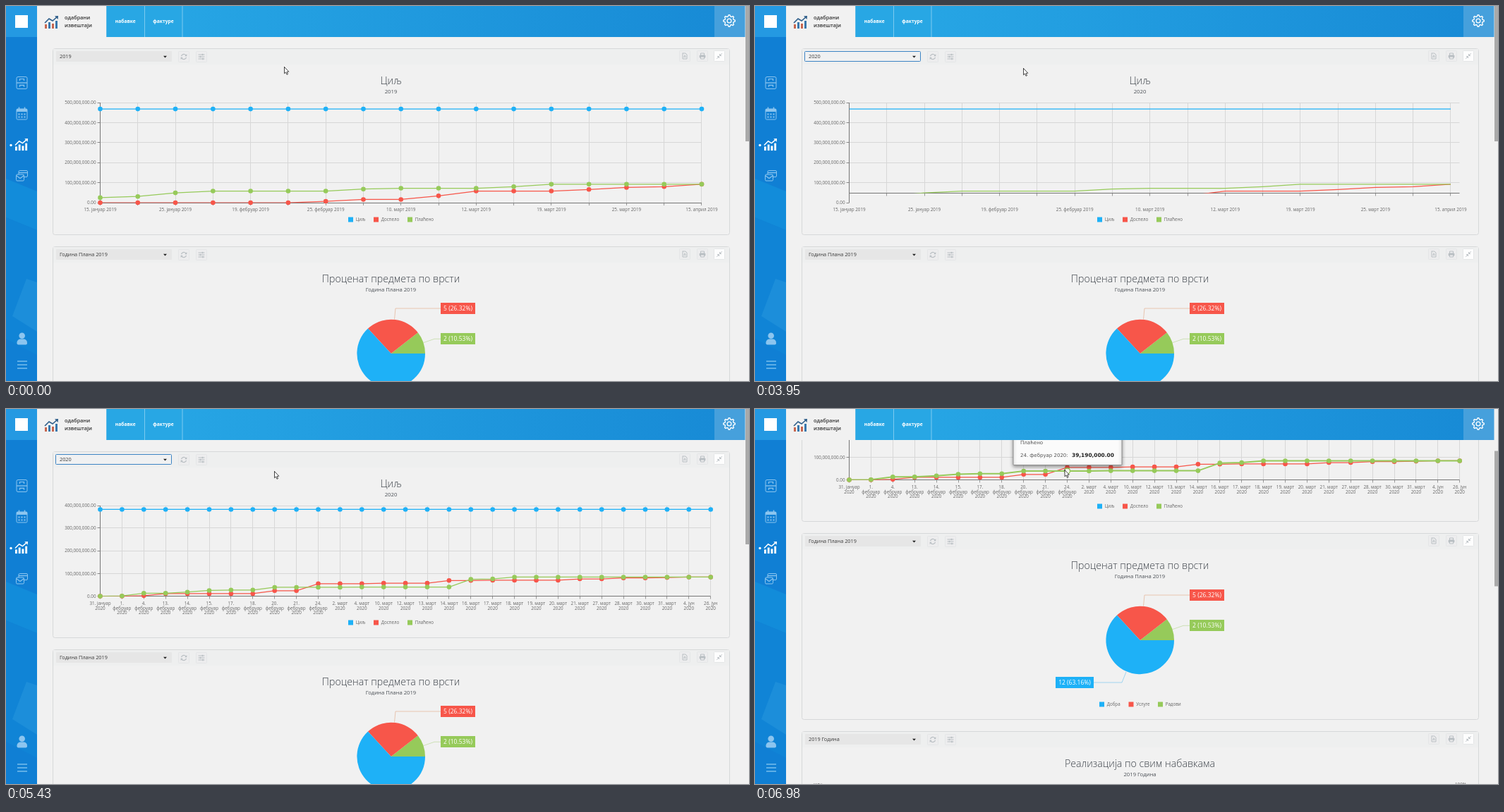
Write an HTML page with a canvas that moves like this. It is 1053 px wide and 532 px high and loops after 8000 ms.

```html
<!DOCTYPE html>
<html lang="sr">
<head>
<meta charset="utf-8">
<title>Извештаји</title>
<style>
html, body { margin: 0; width: 100%; height: 100%; overflow: hidden; background: #f1f1f1; }
canvas { display: block; }
</style>
</head>
<body>
<canvas id="stage" width="1053" height="532"></canvas>
<script>
const W = 1053, H = 532, LOOP = 8000;
const ctx = document.getElementById('stage').getContext('2d');
const BLUE = '#1eb1f7', RED = '#f7564a', GREEN = '#96ca5a';
const FONT = '"Open Sans", "Noto Sans", sans-serif';
const WIDE_FONT = '"DejaVu Sans", sans-serif';

const repeat = (value, n) => Array(n).fill(value);
// Values in hundreds of millions
const BEFORE = [
  repeat(4.68, 17),
  [...repeat(0, 6), .07, .16, .16, .34, .58, .58, .58, .66, .76, .8, .92],
  [.25, .31, .49, ...repeat(.58, 4), .68, .72, .72, .72, .8, ...repeat(.92, 5)]
];
const AFTER = [
  repeat(3.82, 29),
  [0, 0, .02, ...repeat(.11, 5), .24, .24, ...repeat(.55, 3), ...repeat(.57, 3), .69, .69,
    ...repeat(.7, 4), .76, .76, .8, .8, .82, .84, .84],
  [0, .01, .13, .13, .18, .25, .27, .27, ...repeat(.39, 4), ...repeat(.4, 5), .74, .76, ...repeat(.84, 10)]
];
const COLORS = [BLUE, RED, GREEN];
const DATES_2019 = ['15. јануар', '25. јануар', '19. фебруар', '25. фебруар', '10. март', '12. март',
  '19. март', '25. март', '15. април'];
const days = (list, month) => list.split(' ').map(day => [day + '.', month]);
const DATES_2020 = [
  ...days('31', 'јануар'),
  ...days('1 4 13 14 15 17 18 20 21 24', 'фебруар'),
  ...days('2 4 10 12 13 14 16 17 18 19 20 21 27 28 30 31', 'март'),
  ...days('4 26', 'јун')
].map(([day, month]) => month === 'фебруар' ? [day, month, '2020'] : [day + ' ' + month, '2020']);

const lerp = (a, b, p) => a + (b - a) * p;
const ramp = (t, a, b) => Math.min(1, Math.max(0, (t - a) / (b - a)));
const smooth = p => p * p * (3 - 2 * p);
const easeOut = (p, power) => 1 - Math.pow(1 - p, power);
const stepped = t => 440 + 77.6 * Math.floor((t - 440) / 77.6);

function rect(x, y, w, h, fill, stroke, radius = 0) {
  ctx.beginPath();
  ctx.roundRect(x, y, w, h, radius);
  if (fill) { ctx.fillStyle = fill; ctx.fill(); }
  if (stroke) { ctx.strokeStyle = stroke; ctx.lineWidth = 1; ctx.stroke(); }
}

function path(points, color, width = 1, fill) {
  ctx.beginPath();
  points.forEach(([x, y]) => ctx.lineTo(x, y));
  if (fill) { ctx.closePath(); ctx.fillStyle = fill; ctx.fill(); }
  if (color) { ctx.strokeStyle = color; ctx.lineWidth = width; ctx.stroke(); }
}

function circle(x, y, r, fill, stroke, width = 1) {
  ctx.beginPath();
  ctx.arc(x, y, r, 0, Math.PI * 2);
  if (fill) { ctx.fillStyle = fill; ctx.fill(); }
  if (stroke) { ctx.strokeStyle = stroke; ctx.lineWidth = width; ctx.stroke(); }
}

function text(str, x, y, size, color = '#666', align = 'left', weight = 400, font = FONT) {
  ctx.font = `${weight} ${size}px ${font}`;
  ctx.textAlign = align;
  ctx.textBaseline = 'middle';
  ctx.fillStyle = color;
  ctx.fillText(str, x, y);
}

function withAlpha(alpha, draw) {
  if (alpha <= 0) return;
  ctx.save();
  ctx.globalAlpha *= alpha;
  draw();
  ctx.restore();
}

function gradient(x0, y0, x1, y1, from, to) {
  const g = ctx.createLinearGradient(x0, y0, x1, y1);
  g.addColorStop(0, from);
  g.addColorStop(1, to);
  return g;
}

function legend(y, items) {
  items.forEach(([x, label], i) => {
    rect(x, y - 3.5, 7, 7, COLORS[i]);
    text(label, x + 10.7, y + .6, 6.2);
  });
}

function toolButton(x, y, icon, fill = '#ededee') {
  rect(x + .5, y + .5, 15, 15, fill, '#e4e6e7', 1);
  ctx.save();
  ctx.translate(x + 8, y + 8);
  const c = '#b9bfc3';
  if (icon === 'refresh') {
    for (const a of [0, Math.PI]) {
      ctx.save();
      ctx.rotate(a);
      ctx.beginPath();
      ctx.arc(0, 0, 3.6, Math.PI * 1.08, Math.PI * 1.85);
      ctx.strokeStyle = c;
      ctx.lineWidth = 1.2;
      ctx.stroke();
      path([[4.4, -4], [4.4, -.8], [1.4, -.8]], null, 0, c);
      ctx.restore();
    }
  } else if (icon === 'sliders') {
    [[-3, 1.5], [0, -1.5], [3, 2]].forEach(([dy, dx]) => {
      path([[-4.5, dy], [4.5, dy]], c);
      rect(dx - .8, dy - 1.2, 1.6, 2.4, c);
    });
  } else if (icon === 'file') {
    path([[-3, -4], [1, -4], [3, -2], [3, 4], [-3, 4], [-3, -4.5]], c, 1);
    path([[-1.3, 2], [0, -1.5], [1.4, 1.4], [-1.3, 1]], c, .8);
  } else if (icon === 'print') {
    rect(-2.5, -4, 5, 3, null, c);
    rect(-4.3, -1.2, 8.6, 3.6, c);
    rect(-2.5, 1, 5, 3, '#ededee', c);
  } else {
    path([[-3.7, 3.7], [-.8, .8]], c);
    path([[3.7, -3.7], [.8, -.8]], c);
    path([[-3, .6], [-.6, .6], [-.6, 3]], c);
    path([[3, -.6], [.6, -.6], [.6, -3]], c);
  }
  ctx.restore();
}

function panel(y, value, title, subtitle, select = {}) {
  rect(66.5, y + .5, 959, 264, '#f1f1f1', '#d6d8d9', 3);
  rect(67, y + 1, 958, 22, '#eeefef');
  const fill = select.focus ? '#f0f1f2' : select.hover ? '#dce3ec' : '#e6e6e6';
  rect(71, y + 4, 164, 15, fill, null, 1);
  if (select.hover && !select.focus) rect(217, y + 4, 18, 15, '#b9cde1');
  if (select.focus) rect(70.5, y + 4.5, 164, 14, null, '#3d84c4', 1);
  text(value, 76, y + 12, 7.3, '#3a3a3a');
  path([[223, y + 10.7], [228, y + 10.7], [225.5, y + 13.4]], null, 0, '#222');
  toolButton(244, y + 4, 'refresh');
  toolButton(269, y + 4, 'sliders');
  toolButton(954, y + 3, 'file');
  toolButton(979, y + 3, 'print');
  toolButton(1003, y + 3, 'collapse', '#fdfdfd');
  text(title, 545.5, y + 47.2, 14.2, '#3b4148', 'center', 300);
  text(subtitle, 545.5, y + 62, 7.7, '#4a4f55', 'center');
}

function lineChart(t, motion) {
  const p = easeOut(ramp(motion, 3950, 5235), 3);
  const morphing = t >= 3950;
  const left = 133.5, top = 137;
  const bottom = morphing ? 265.5 : 279, right = morphing ? 998.5 : 986;
  const zero = lerp(279, 265.5, p), unit = lerp(28.4, 32.2, p);
  const oldAlpha = 1 - ramp(motion, 3950, 4300), newAlpha = ramp(motion, 4400, 4900);
  const grid = '#d7d7d7', axis = '#777';
  const oldX = i => left + 53.28 * i, newX = i => left + 30.9 * i;

  const columns = (count, xAt) => {
    for (let i = 0; i < count; i++) {
      const x = Math.floor(xAt(i)) + .5;
      path([[x, top], [x, bottom]], grid);
      path([[x, bottom], [x, bottom + 4]], '#999');
    }
  };
  withAlpha(oldAlpha, () => {
    columns(17, oldX);
    DATES_2019.forEach((date, i) => text(date + ' 2019', oldX(i * 2), 289.6, 6.3, '#666', 'center'));
  });
  withAlpha(newAlpha, () => {
    columns(29, newX);
    DATES_2020.forEach((lines, i) =>
      lines.forEach((line, row) => text(line, newX(i), 276.6 + row * 6.5, 6.3, '#666', 'center')));
  });

  for (let k = 0; k < 6; k++) {
    const y = Math.max(top, zero - k * unit), lineY = Math.floor(y) + .5;
    withAlpha(k === 5 ? oldAlpha : 1, () => {
      if (y <= bottom) path([[left, lineY], [right, lineY]], grid);
      path([[left - 4, lineY], [left, lineY]], '#888');
      text(k ? k + '00,000,000.00' : '0.00', 127.5, y + .6, 6.3, '#666', 'right');
    });
  }
  path([[left, top], [left, Math.max(bottom, zero)]], axis);
  path([[left, Math.floor(bottom) + .5], [right, Math.floor(bottom) + .5]], axis);

  const curves = AFTER.map((values, s) => {
    const count = morphing ? 29 : 17;
    return Array.from({ length: count }, (_, i) => {
      const j = Math.min(i, 16);
      return [lerp(oldX(j), newX(i), p), zero - unit * lerp(BEFORE[s][j], values[i], p)];
    });
  });
  const hovered = t >= 6740;
  const bulletAlpha = t < 3030 ? 1 : ramp(motion, 4800, 5280);
  curves.forEach((points, s) => {
    ctx.save();
    ctx.beginPath();
    ctx.rect(left, top - 2, right - left, bottom - top + 2.3);
    ctx.clip();
    path(points, COLORS[s], hovered && s === 2 ? 2 : 1.25);
    ctx.restore();
    withAlpha(bulletAlpha, () => points.forEach(([x, y]) => circle(x, y, 3.3, COLORS[s])));
  });
  if (t >= 6830) circle(...curves[2][10], 4, '#f8fbf3', GREEN, 1.5);

  legend(303, [[485, 'Циљ'], [521, 'Доспело'], [569, 'Плаћено']]);
}

function pieChart() {
  const x = 545.7, y = 493, r = 48.3, turn = Math.PI * 2;
  let angle = 0;
  [[2, GREEN], [5, RED], [12, BLUE]].forEach(([count, color]) => {
    const next = angle - turn * count / 19;
    ctx.beginPath();
    ctx.moveTo(x, y);
    ctx.arc(x, y, r, angle, next, true);
    ctx.fillStyle = color;
    ctx.fill();
    angle = next;
  });
  path([[550.5, 444.5], [552, 429], [616, 429]], '#e5b9a0', .8);
  path([[592, 477.5], [607, 472.3], [616, 472.3]], '#c3dca8', .8);
  path([[526, 538], [520, 553], [480, 553]], '#8bcdee', .8);
  const tag = (left, top, w, color, label) => {
    rect(left, top, w, 16, color);
    text(label, left + w / 2, top + 8.8, 8.5, '#fff', 'center');
  };
  tag(616, 421, 49, RED, '5 (26.32%)');
  tag(616, 464, 49, GREEN, '2 (10.53%)');
  tag(426, 545, 54, BLUE, '12 (63.16%)');
  legend(584, [[488, 'Добра'], [529.5, 'Услуге'], [571, 'Радови']]);
}

function shadowed(draw) {
  ctx.save();
  ctx.shadowColor = 'rgba(0,0,0,.4)';
  ctx.shadowBlur = 5;
  ctx.shadowOffsetY = 2;
  draw();
  ctx.restore();
}

function dropdown(cursorY) {
  shadowed(() => rect(71, 80, 164, 37, '#fff'));
  const second = cursorY >= 98;
  rect(72, second ? 98.5 : 80.5, 162, 18, '#337ab7');
  text('2019', 77, 90, 7.3, second ? '#444' : '#fff');
  text('2020', 77, 108, 7.3, second ? '#fff' : '#444');
}

function tooltip(t) {
  withAlpha(ramp(t, 6740, 6960), () => {
    shadowed(() => rect(366, 185, 154, 59.5, '#fbfbfb', '#8d8d8d', 1));
    text('Плаћено', 376, 213.5, 7.1, '#555', 'left', 400, WIDE_FONT);
    text('24. фебруар 2020:', 376, 231, 7, '#555', 'left', 400, WIDE_FONT);
    text('39,190,000.00', 449, 231, 7.4, '#222', 'left', 700, WIDE_FONT);
  });
}

function trendIcon(x, y, s, colors) {
  ctx.save();
  ctx.translate(x, y);
  ctx.scale(s, s);
  [6, 9, 7, 11].forEach((h, i) => rect(i * 5, 18 - h, 3, h, colors[i % 2]));
  path([[0, 10], [6, 4], [11, 7], [18, 1]], colors[2], 1.6);
  path([[14, .3], [19, 0], [18.6, 5]], null, 0, colors[2]);
  ctx.restore();
}

function gear(x, y) {
  ctx.beginPath();
  for (let i = 0; i <= 32; i++) {
    const r = i % 4 < 2 ? 8.3 : 6.3, a = (i - .5) * Math.PI / 16;
    ctx.lineTo(x + r * Math.cos(a), y + r * Math.sin(a));
  }
  ctx.closePath();
  ctx.strokeStyle = '#fff';
  ctx.lineWidth = 1.3;
  ctx.stroke();
  circle(x, y, 2.9, null, '#fff', 1.3);
}

function header() {
  rect(44, 0, 1004, 44, gradient(44, 0, 1004, 0, '#2aace8', '#188bd6'));
  rect(44, 0, 98.5, 44, '#f1f1f1');
  rect(142.5, 0, 107.5, 44, '#28a7e4');
  rect(196, 0, 1, 44, '#7ccbf0');
  rect(249.5, 0, 1, 44, '#7ccbf0');
  rect(1004, 0, 44, 44, '#46a0dc');
  trendIcon(55, 14, 1, ['#c8674f', '#3a78ad', '#2f5f8b']);
  text('одабрани', 83, 17.3, 7.3, '#333', 'left', 600);
  text('извештаји', 83, 28, 7.3, '#333', 'left', 600);
  text('набавке', 169.3, 22.7, 6.7, '#fff', 'center', 700);
  text('фактуре', 223, 22.7, 6.7, '#fff', 'center', 700);
  gear(1025, 21);
}

function sidebar() {
  rect(0, 0, 44, H, '#107fd4');
  path([[0, 245], [44, 263], [44, 318], [0, 300]], null, 0, '#128cda');
  path([[0, 300], [44, 318], [44, 495], [0, 472]], null, 0, '#1084d6');
  path([[29, 387], [44, 392], [44, 462], [9, 440]], null, 0, '#1c8eda');
  rect(0, 0, 44, 44, '#2499e2');
  rect(13, 13, 18, 18, '#fff');

  const c = '#8cc5ef';
  rect(15, 100.5, 15, 17, null, c, 2);
  path([[15, 109], [30, 109]], c, 1.3);
  for (const y of [103.5, 112.3]) path([[19.5, y + 2.5], [19.5, y], [25.5, y], [25.5, y + 2.5]], c, 1.2);

  rect(15, 146, 15, 15, null, c, 1.5);
  rect(15, 146, 15, 4, c);
  for (const x of [18.5, 26.5]) path([[x, 143.5], [x, 147]], c, 1.5);
  for (let i = 0; i < 6; i++) rect(17.5 + i % 3 * 4, 152.5 + Math.floor(i / 3) * 4, 2, 2, c);

  circle(7, 197.5, 1.7, '#fff');
  trendIcon(13, 188, .95, ['#fff', '#fff', '#fff']);

  rect(18, 233.5, 12.5, 9, null, c, 1.5);
  path([[18, 236.5], [30, 236.5]], c, 1.3);
  rect(14.5, 239, 11, 9, '#107fd4', c, 1.5);
  path([[14.5, 240.5], [20, 244.5], [25.5, 240.5]], c, 1.2);

  circle(22.7, 467.7, 4.3, c);
  rect(15.5, 472.5, 14.5, 8, c, null, [5, 5, 2, 2]);
  for (const y of [503, 508, 513]) rect(16, y, 14, 2, '#5daee6');
}

function cursorAt(t) {
  if (t < 1000) {
    const u = smooth(ramp(t, 400, 900));
    return [lerp(394, 248, u), 86 + 38 * Math.sin(Math.PI * u)];
  }
  const legs = [
    [980, 1210, 218, 69], [1680, 2480, 196, 105], [3080, 3710, 380, 88], [6400, 6830, 438.5, 86]
  ];
  let x = 248, y = 86;
  for (const [from, to, nx, ny] of legs) {
    const u = smooth(ramp(t, from, to));
    x = lerp(x, nx, u);
    y = lerp(y, ny, u);
  }
  return [x, y];
}

function cursor(x, y) {
  ctx.save();
  ctx.translate(x + .5, y + .5);
  path([[0, 0], [0, 9.3], [2, 7.4], [3.5, 10.8], [5, 10.1], [3.6, 6.9], [6.3, 6.7], [0, 0], [0, 1]], '#333', .9, '#fff');
  ctx.restore();
}

function render(t) {
  const motion = stepped(t);
  const [cx, cy] = cursorAt(motion);
  const scroll = Math.round(165 * easeOut(ramp(motion, 5850, 6640), 2.28));
  const year = t < 3030 ? '2019' : '2020';
  rect(0, 0, W, H, '#f1f1f1');

  ctx.save();
  ctx.translate(0, -scroll);
  panel(60, year, 'Циљ', year, { hover: t >= 1130, focus: t >= 1550 });
  lineChart(t, motion);
  panel(341, 'Година Плана 2019', 'Проценат предмета по врсти', 'Година Плана 2019');
  pieChart();
  panel(622, '2019 Година', 'Реализација по свим набавкама', '2019 Година');
  text('млн', 83, 698.5, 6.3);
  text('100%', 1008, 698.5, 6.3, '#666', 'right');
  if (t >= 1710 && t < 3110) dropdown(cy);
  tooltip(t);
  ctx.restore();

  header();
  sidebar();
  rect(1047.5, 0, 5.5, H, '#f1f1f1');
  rect(1048, scroll * .361, 5, 192, '#a9a9a9');

  if (t >= 1380 && t < 1550) circle(217.5, 71, 6, 'rgba(240,222,40,.8)');
  cursor(cx, cy);
}

const start = performance.now();
function tick() {
  render((performance.now() - start) % LOOP);
  requestAnimationFrame(tick);
}
tick();
</script>
</body>
</html>
```
